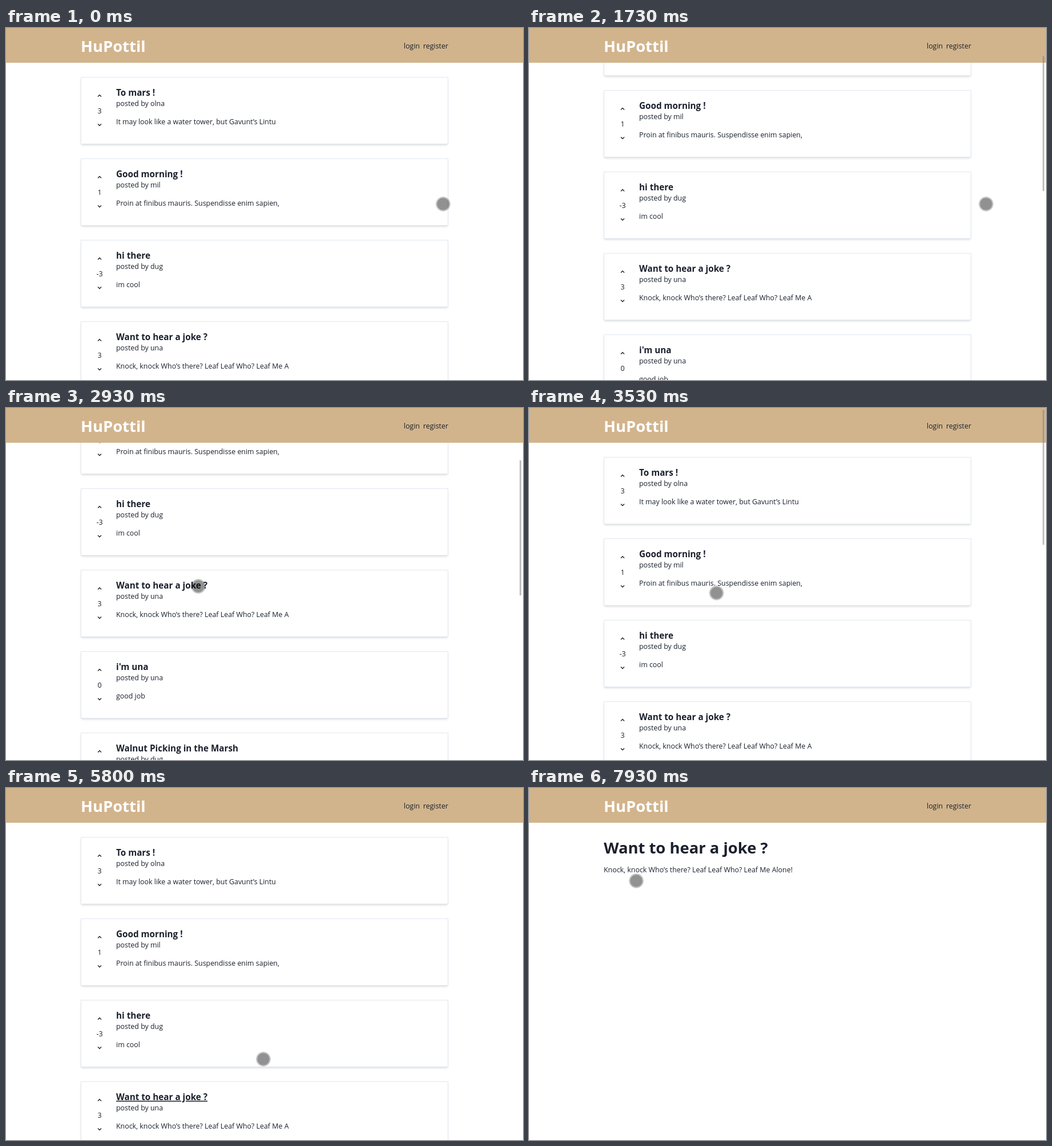
An HTML page that plays this animation: 906x618 px, repeating every 8000 ms.

```html
<!DOCTYPE html>
<html lang="en">
<head>
<meta charset="utf-8">
<title>HuPottil</title>
<style>
  @property --scroll { syntax: "<integer>"; inherits: true; initial-value: 0; }

  html, body { margin: 0; width: 100%; height: 100%; overflow: hidden; background: #fff; }
  #stage { position: relative; width: 906px; height: 618px; overflow: hidden; }
  #stage div, #stage > svg { position: absolute; }
  svg { display: block; overflow: visible; }
  text { font: 12.4px "Open Sans", "Noto Sans", sans-serif; fill: #1a202c; }
  .title { font-size: 15.25px; font-weight: 700; }
  .big { font-size: 27.4px; font-weight: 700; }
  .logo { fill: #fff; }
  .mid { text-anchor: middle; }
  .chevron { fill: none; stroke: #1a202c; stroke-width: 1.3; }
  .card {
    left: 131px; width: 644px; height: 118px; box-sizing: border-box;
    border: 1px solid #e2e8f0; background: #fff;
    box-shadow: 0 3.2px 4.8px -.8px rgba(0,0,0,.12), 0 1.6px 3.2px -.8px rgba(0,0,0,.07);
  }
  .card svg { position: absolute; left: -1px; top: -1px; }
  #flash { fill: #33b5e5; }
  #header { left: 0; top: 0; width: 906px; height: 61px; background: #d2b48c; }
  #list { transform: translateY(calc(var(--scroll) * -1px)); }
  #thumb {
    left: 900px; top: 3px; width: 3px; height: 237px; background: rgba(128,128,128,.5);
    transform: translateY(calc(var(--scroll) * .385px));
  }
  #cursor {
    left: -13px; top: -13px; width: 26px; height: 26px;
    background: radial-gradient(circle, rgba(0,0,0,.43) 10.2px, rgba(0,0,0,.24) 10.8px 12.4px, transparent 13px);
  }

  /* Every part shares the 8 s loop; each stretch between key points eases in and out. */
  #stage, #thumb, #cursor { animation: 8s cubic-bezier(.333, 0, .667, 1) infinite; }
  #list, #post, #flash, .card:nth-child(4) .title { animation: 8s step-end infinite; }
  #stage { animation-name: scroll; }
  #thumb { animation-name: thumb; }
  #cursor { animation-name: cursor; }
  #list { animation-name: leave; }
  #post { animation-name: enter; }
  #flash { animation-name: flash; }
  .card:nth-child(4) .title { animation-name: tapped; }

  @keyframes scroll {
    0%, 10.72% { --scroll: 0; }
    14.75%, 19.9% { --scroll: 80; }
    25.34%, 36.09% { --scroll: 241; }
    40.75%, 100% { --scroll: 0; }
  }
  @keyframes thumb {
    0%, 10.7%, 19.88%, 32%, 36.08%, 47%, 100% { opacity: 0; }
    10.72%, 17.8%, 19.9%, 28.4%, 36.1%, 43.75% { opacity: 1; }
  }
  @keyframes cursor {
    0%, .85% { transform: translate(766px, 309px); }
    3.3%, 25.8% { transform: translate(801px, 309px); }
    32.4%, 43.3% { transform: translate(337px, 313px); }
    49% { transform: translate(201px, 500px); }
    52.4% { transform: translate(246px, 563px); }
    54%, 61.7% { transform: translate(266px, 551px); }
    67% { transform: translate(855px, 585px); }
    72.4%, 84.2% { transform: translate(451px, 476px); }
    87.4%, 91.7% { transform: translate(508px, 430px); }
    96.5%, 97.5% { transform: translate(118px, 162px); }
    99.1%, 100% { transform: translate(188px, 163px); }
  }
  @keyframes flash {
    0%, 59.9%, 100% { opacity: 0; }
    57.4% { opacity: .4; }
    59.1% { opacity: .2; }
  }
  @keyframes tapped {
    0% { text-decoration-line: none; }
    57.4%, 100% { text-decoration-line: underline; }
  }
  @keyframes leave {
    0% { visibility: visible; }
    79.1%, 100% { visibility: hidden; }
  }
  @keyframes enter {
    0% { visibility: hidden; }
    79.9%, 100% { visibility: visible; }
  }
</style>
</head>
<body>
<div id="stage">
  <div id="list"></div>
  <svg id="post" width="906" height="618">
    <text class="big" x="131" y="115">Want to hear a joke ?</text>
    <text x="131" y="148">Knock, knock Who’s there? Leaf Leaf Who? Leaf Me Alone!</text>
  </svg>
  <div id="header">
    <svg width="906" height="61">
      <text class="big logo" x="131" y="42">HuPottil</text>
      <text x="697" y="36">login</text>
      <text x="775" y="36" text-anchor="end">register</text>
    </svg>
  </div>
  <div id="thumb"></div>
  <div id="cursor"></div>
</div>
<script>
const LOOP = 8000, TICK = 1000 / 15;
const list = document.getElementById("list");

// title, author, score, excerpt
const posts = [
  ["To mars !", "olna", 3, "It may look like a water tower, but Gavunt’s Lintu"],
  ["Good morning !", "mil", 1, "Proin at finibus mauris. Suspendisse enim sapien,"],
  ["hi there", "dug", -3, "im cool"],
  ["Want to hear a joke ?", "una", 3, "Knock, knock Who’s there? Leaf Leaf Who? Leaf Me A"],
  ["i'm una", "una", 0, "good job"],
  ["Walnut Picking in the Marsh", "dug", 0, ""]
];

list.innerHTML = posts.map(([title, author, score, excerpt], i) => `
  <div class="card" style="top:${86 + i * 143}px"><svg width="644" height="118">
    <path class="chevron" d="M30 34.5l3-3 3 3M30 82.5l3 3 3-3"/>
    <text class="mid" x="33" y="64">${score}</text>
    <text class="title" x="62" y="33">${title}</text>
    <text x="62" y="51">posted by ${author}</text>
    <text x="62" y="83">${excerpt}</text>
  </svg></div>`).join("");

list.children[3].firstElementChild.insertAdjacentHTML("beforeend",
  '<path id="flash" d="M62 15H222V17H627V36H222V38H62Z"/>');

// The keyframes advance in 15 pictures per second, as a screen recording does.
const animations = document.getAnimations();
animations.forEach(a => a.pause());
const start = performance.now();

function run() {
  const ms = (performance.now() - start) % LOOP;
  const tick = Math.floor((ms + 5) / TICK);
  animations.forEach(a => { a.currentTime = tick * TICK % LOOP; });
  requestAnimationFrame(run);
}
run();
</script>
</body>
</html>
```
